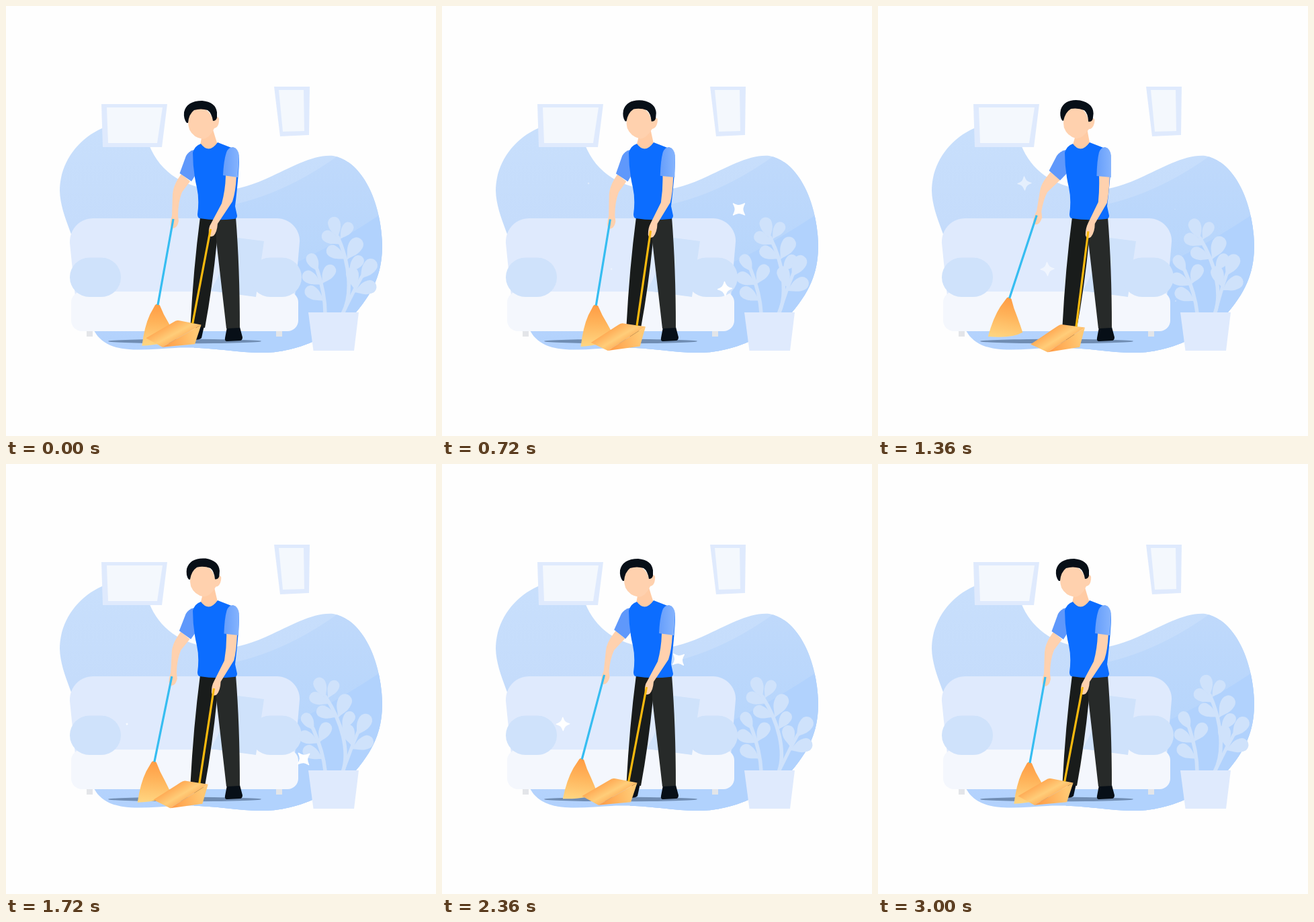
An HTML page for the animation above (3.08 s loop, 640 by 640 pixels).

```html
<!DOCTYPE html>
<html lang="en">
<head>
<meta charset="utf-8">
<title>Sweeping the living room</title>
<style>
  html, body { margin: 0; width: 100%; height: 100%; overflow: hidden; background: #fefefe; }
  svg { display: block; width: 100%; height: 100%; }
</style>
</head>
<body>
<svg viewBox="0 0 640 640">
  <defs>
    <clipPath id="blobClip">
      <path id="blobShape" d="M143 182C105 199 80 235 80 275C81 315 108 350 112 400C116 445 125 480 139 494C165 521 220 509 265 508.500C310 508 350 517 387 516C440 514 490 488 520 457C552 420 560 390 560 355C558 290 530 231 487 223C438 219 380 276 318 274C262 271 229 246 213 207C200 166 168 170 143 182Z"/>
    </clipPath>
    <linearGradient id="wall" x1="0" y1="180" x2="0" y2="516" gradientUnits="userSpaceOnUse">
      <stop offset="0" stop-color="#c8dffc"/><stop offset=".42" stop-color="#c5dcfb"/><stop offset="1" stop-color="#b1d1fd"/>
    </linearGradient>
    <linearGradient id="mid" x1="0" y1="225" x2="0" y2="400" gradientUnits="userSpaceOnUse">
      <stop offset="0" stop-color="#bfd9fb"/><stop offset="1" stop-color="#b6d5fc"/>
    </linearGradient>
    <linearGradient id="sleeve">
      <stop offset="0" stop-color="#669efb"/><stop offset="1" stop-color="#86b4fd"/>
    </linearGradient>
    <linearGradient id="bristle" x1=".4" y1="0" x2=".5" y2="1">
      <stop offset="0" stop-color="#ff9c44"/><stop offset=".4" stop-color="#ffb35a"/><stop offset="1" stop-color="#ffda86"/>
    </linearGradient>
    <linearGradient id="panBack" x1="-42" y1="158" x2="-20" y2="185" gradientUnits="userSpaceOnUse">
      <stop offset="0" stop-color="#ffab55"/><stop offset=".45" stop-color="#ffcd79"/><stop offset="1" stop-color="#ff9e49"/>
    </linearGradient>
    <linearGradient id="panFront" x1="-36" y1="184" x2="10" y2="166" gradientUnits="userSpaceOnUse">
      <stop offset="0" stop-color="#ff9b45"/><stop offset="1" stop-color="#ffc873"/>
    </linearGradient>
  </defs>

  <!-- room -->
  <use href="#blobShape" fill="url(#wall)"/>
  <g clip-path="url(#blobClip)">
    <path d="M494 223Q420 276 345 294Q300 306 280 325V520H600V223Z" fill="url(#mid)"/>
    <path d="M556 311Q480 361 425 385Q340 430 280 470V520H600V311Z" fill="#b1d2fd"/>
  </g>
  <g fill="#dfeafd">
    <path d="M142 146H240L232 210H144Z"/>
    <path d="M399 120H452L451 192L408 194Z"/>
  </g>
  <g fill="#f4f8fd">
    <path d="M150 151H233L225 204H152Z"/>
    <path d="M406 125H443L444 186L412 187Z"/>
  </g>

  <!-- sofa -->
  <path d="M120 483h9v9h-9zM402 483h9v9h-9z" fill="#e3e5e9"/>
  <path d="M130 316H403C424 316 438 334 437 351L430 432H103L95 353C94 332 110 316 130 316Z" fill="#dfeafd"/>
  <rect x="97" y="425" width="338" height="59" rx="16" fill="#f4f7fd"/>
  <g fill="#cfe2fb">
    <path d="M345 345L384 350L372 433L305 424Z"/>
    <rect x="95" y="374.500" width="76" height="58.500" rx="29"/>
    <rect x="364" y="374.500" width="76" height="58.500" rx="29"/>
  </g>

  <!-- plant -->
  <g fill="#cfe2fb" stroke="#cfe2fb" stroke-linecap="round">
    <g id="shoot"><path d="M475 458Q475 428 463 392" fill="none" stroke-width="5.500"/></g>
    <g id="stem"><path d="M501 458C516 430 512 385 494 344" fill="none" stroke-width="5.500"/></g>
    <g id="branch"><path d="M501 458Q512 436 519 422L530 402" fill="none" stroke-width="5"/></g>
  </g>
  <path d="M450 456H525L518 513H457.500Z" fill="#dfeafd"/>

  <ellipse cx="266" cy="499" rx="114" ry="3.300" fill="#708db3"/>

  <!-- man -->
  <path d="M283 476H295L291 494Q289 497 279 497Z" fill="#070f17"/>
  <path d="M329 478H348L352 493Q352 498 348 498L329 499Q325 499 326 494Z" fill="#070f17"/>
  <path d="M289 314H319L314 350Q307 420 296 479L274.500 476Q279 390 289 314Z" fill="#191c1b"/>
  <path d="M312 314H342Q348 390 348 479L328 480Q320 410 313 350Z" fill="#272a29"/>
  <g id="head">
    <path d="M292 190L289 208Q303 218 316 210L308 184Z" fill="#ffcba4"/>
    <path d="M271 172Q271 155 289 152Q303 153 308 170L312 166Q318 163 317 172Q316 181 310 182Q303 197 293 198Q279 196 273 184Q271 178 271 172Z" fill="#ffd1ae"/>
    <path d="M269 174Q264 168 265 158Q269 141 292 141Q312 143 314 158V166Q313 171 308 171Q306 159 300 155Q290 152 280 155Q272 161 271 174Z" fill="#070f17"/>
  </g>
  <path id="armL" fill="#ffd1ae"/>
  <path id="sleeveL" fill="#5f98fb"/>
  <path d="M278 218Q281 208 290 205Q302 221 315 203L333 210Q346 214 347 226Q347 248 341 298L344 312Q344 317 339 317Q312 320 288 316Q285 315 285 310Q288 288 284 270Q278 245 278 218Z" fill="#0c6dff"/>
  <path id="armR" fill="#ffd1ae"/>
  <path id="sleeveR" fill="url(#sleeve)"/>

  <g id="broom">
    <path d="M-4 131Q-2 127 3 130Q11 143 20 153Q28 163 34.500 172Q22 186 -12.500 194Q-14 165 -9 146Z" fill="url(#bristle)"/>
    <path d="M0 0V130" stroke="#36bdf1" stroke-width="3.200"/>
  </g>
  <g id="pan">
    <path d="M-64 177.500L-28 146Q-24 142 -20 142.500L13 142.500L-37.500 186Z" fill="url(#panBack)"/>
    <path d="M13 142.500L9 172.500L-37.500 186Z" fill="url(#panFront)"/>
    <path d="M0 0V143" stroke="#f9b90f" stroke-width="3.200"/>
  </g>
  <g id="stars"></g>
</svg>

<script>
const LOOP = 3080, STEP = 40;
const $ = id => document.getElementById(id);

function add(parent, d, attrs) {
  const el = document.createElementNS('http://www.w3.org/2000/svg', 'path');
  el.setAttribute('d', d);
  for (const k in attrs) el.setAttribute(k, attrs[k]);
  parent.appendChild(el);
  return el;
}

// Teardrop leaf from its base to its round tip.
function leaf(parent, x, y, tx, ty) {
  const len = Math.hypot(tx - x, ty - y);
  const turn = Math.atan2(ty - y, tx - x) * 180 / Math.PI;
  add($(parent), 'M0 0C.3 -.12 .36 -.28 .72 -.28A.28 .28 0 0 1 .72 .28C.36 .28 .3 .12 0 0Z',
    { transform: `translate(${x} ${y}) rotate(${turn}) scale(${len})`, stroke: 'none' });
}
[
  ['stem', 494, 346, 486, 314], ['stem', 497, 347, 514, 323], ['stem', 498, 355, 471, 338],
  ['stem', 507, 378, 527, 346], ['stem', 506, 377, 478, 360], ['stem', 510, 396, 530, 373],
  ['branch', 527, 407, 549, 378], ['branch', 519, 422, 514, 389], ['branch', 517, 426, 551, 415],
  ['shoot', 465, 396, 451, 369], ['shoot', 470, 414, 487, 386],
  ['shoot', 470, 415, 442, 398], ['shoot', 474, 439, 446, 420]
].forEach(a => leaf(...a));

// Smooth curve through [time, value] pairs, level at every peak.
function track(...keys) {
  const slope = i => (keys[i + 1][1] - keys[i][1]) / (keys[i + 1][0] - keys[i][0]);
  const tan = keys.map((k, i) => {
    if (!i || i === keys.length - 1) return 0;
    const a = slope(i - 1), b = slope(i);
    return a * b > 0 ? 2 * a * b / (a + b) : 0;
  });
  return t => {
    let i = 0;
    while (i < keys.length - 2 && t >= keys[i + 1][0]) i++;
    const [t0, v0] = keys[i], [t1, v1] = keys[i + 1], h = t1 - t0, u = (t - t0) / h;
    const w = u * u * (3 - 2 * u);
    return v0 + (v1 - v0) * w + h * u * (1 - u) * (tan[i] * (1 - u) - tan[i + 1] * u);
  };
}

const lean = track([0, 0], [400, .35], [1040, .95], [1240, 1], [1360, .97], [1720, .57], [2320, 0], [LOOP, 0]);
const sweep = track([0, 0], [560, -.27], [1280, 1.03], [2000, -.27], [2600, 1.03], [3000, 0], [LOOP, 0]);
const stemTurn = track([0, 0], [400, -.9], [1040, -5.3], [1360, -7.5], [1720, -9.5], [1960, -9.8], [2360, -8.8], [3000, 0], [LOOP, 0]);
const shootTurn = track([0, 0], [400, -1.3], [1040, -4.7], [1500, -6], [1720, -5.600], [2360, -2.200], [3000, 0], [LOOP, 0]);

// Two poses of each limb part; the time picks a blend.
const poses = {
  armL: ['M261 250Q249 266 248 280L247 312Q242 328 248 331Q255 331 257 320L256 312Q256 292 262 277L274 261Z',
         'M257 247Q242 264 241 275L236 305Q228 320 233 325Q240 327 244 315L243 306Q246 288 252 277L271 259Z'],
  sleeveL: ['M280 214Q272 216 268 223L258.500 249L276 261L283 250Z',
            'M280 214Q271 216 266 223L254.500 245L271 259.500L283 247Z'],
  armR: ['M327 250L343 252Q342 276 337 291L315 324Q314 337 309 342Q303 345 302 340Q301 330 305 324L321 294Q327 272 327 250Z',
         'M329 250L345 251Q344 279 341 293L323 324Q323 337 317 344Q311 348 309 341Q309 331 313 323L328 292Q330 272 329 250Z'],
  sleeveR: ['M328 218Q331 210 338 210Q346 212 347 223L345 255L323 252Q324 230 328 218Z',
            'M329 218Q332 210 338 210Q346 212 347 223L347 255L325.500 253Q326 230 329 218Z']
};
const mix = (a, b, k) => a + (b - a) * k;
function blend(id, k) {
  const [a, b] = poses[id], nums = b.match(/[\d.]+/g);
  let i = 0;
  $(id).setAttribute('d', a.replace(/[\d.]+/g, n => mix(+n, +nums[i++], k).toFixed(2)));
}

// x, y, start, radius, opacity
const stars = [
  [421, 421, 40, 12.5, 1], [442, 302.5, 370, 13.5, 1], [218, 264, 680, 12, .55],
  [252, 391.5, 680, 12, .55], [443, 439, 1340, 12.5, 1], [180, 387, 1670, 12, 1], [352, 291, 1980, 12, 1]
].map(([x, y, start, r, opacity]) => ({
  x, y, start, r,
  el: add($('stars'), 'M0 -1C.2 -.36 .36 -.2 1 0C.36 .2 .2 .36 0 1C-.2 .36 -.36 .2 -1 0C-.36 -.2 -.2 -.36 0 -1Z',
    { fill: '#fff', stroke: '#fff', 'stroke-width': .12, 'stroke-linejoin': 'round', opacity })
}));

const place = (id, value) => $(id).setAttribute('transform', value);

function draw(t) {
  const p = lean(t), b = sweep(t);
  place('head', `rotate(${7 * p} 301 215)`);
  blend('armL', b);
  blend('sleeveL', b);
  blend('armR', p);
  blend('sleeveR', p);
  place('broom', `translate(${mix(249, 236, b)} ${mix(317, 311.5, b)}) rotate(${mix(10.2, 18.3, b)})`);
  place('pan', `translate(${mix(304.5, 313.2, p)} ${mix(332, 335.5, p)}) rotate(${mix(10.8, 7.1, p)})`);
  place('stem', `rotate(${stemTurn(t)} 500 456)`);
  place('branch', `rotate(${-11 * p} 500 456)`);
  place('shoot', `rotate(${shootTurn(t)} 475 456)`);
  for (const s of stars) {
    const age = t - s.start;
    const size = age > 0 && age < 1000 ? s.r * Math.sin(Math.PI * age / 1000) : 0;
    s.el.style.display = size ? '' : 'none';
    s.el.setAttribute('transform', `translate(${s.x} ${s.y}) rotate(${age * .128}) scale(${size})`);
  }
}

const begin = performance.now();
function tick() {
  const t = (performance.now() - begin) % LOOP;
  draw(Math.floor(t / STEP) * STEP);
  requestAnimationFrame(tick);
}
tick();
</script>
</body>
</html>
```
